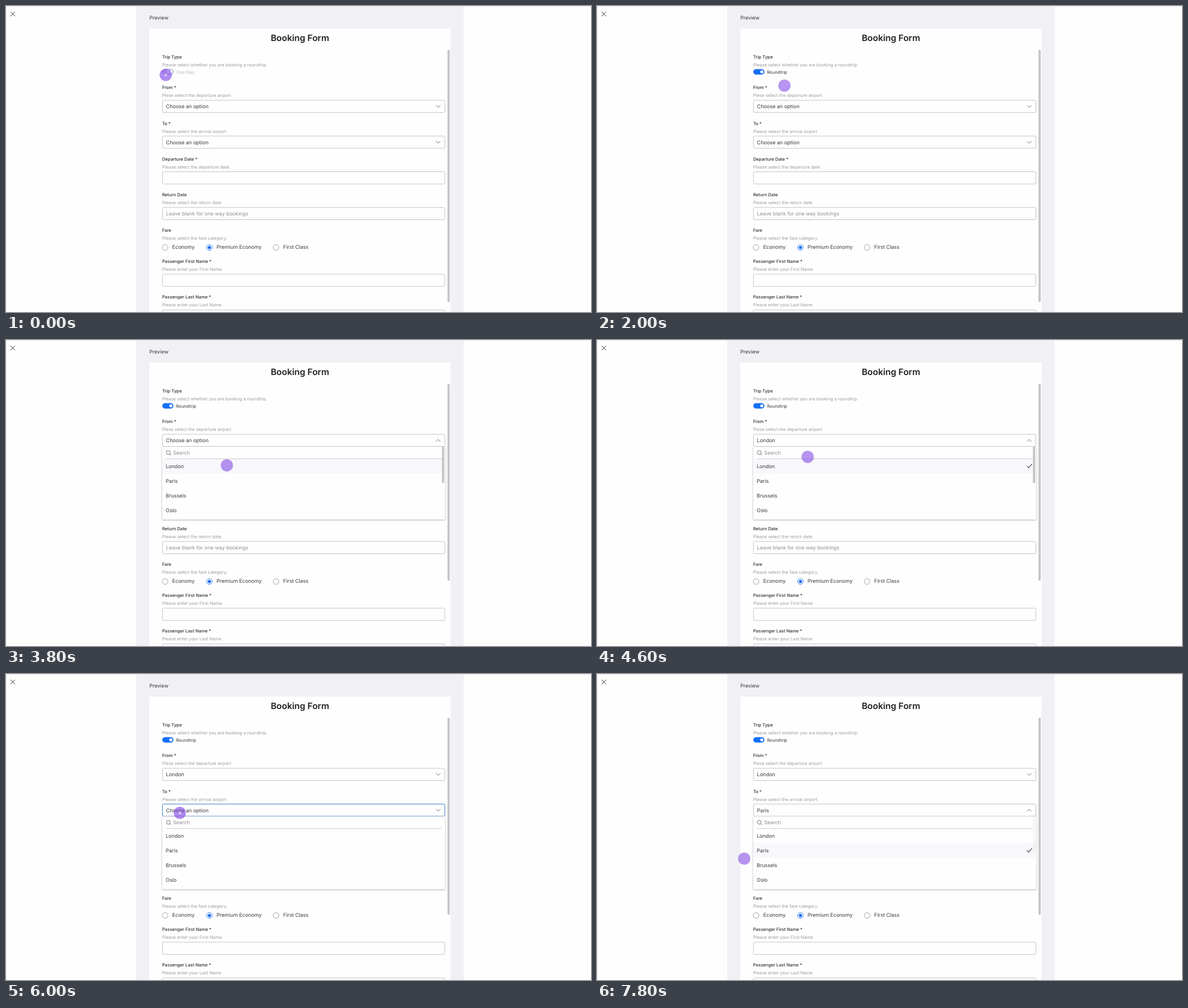
Animation of 1033x542 px, one loop 8 s. Source, as an HTML page:

```html
<!DOCTYPE html>
<html lang="en">
<head>
<meta charset="utf-8">
<title>Booking Form</title>
<style>
  html, body { margin: 0; width: 100%; height: 100%; overflow: hidden; background: #fefefe; }
  svg { display: block; }
  text { font: 400 9px Inter, sans-serif; fill: #37373d; text-rendering: geometricPrecision; }
  text.title { font-size: 15.47px; font-weight: 600; fill: #1d1d22; text-anchor: middle; }
  text.label { font-size: 7.72px; font-weight: 500; fill: #2c2c32; }
  text.hint { font-size: 7.72px; fill: #9c9ca1; }
  text.state { font-size: 7.72px; }
  text.soft { fill: #8e8e94; }
  .field { fill: #fefefe; stroke: #c3c3c8; }
  .line { fill: none; stroke: #66666c; stroke-width: .9; }
  .menu { filter: drop-shadow(0 1px 1.5px rgba(0, 0, 0, .3)); }
</style>
</head>
<body>
<svg id="stage" width="1033" height="542" viewBox="0 0 1033 542"></svg>
<script>
const stage = document.getElementById('stage');
const LOOP = 8000, STEP = 200, ROW = 63.3, ITEM = 25.8;

function add(tag, attrs, parent = stage) {
  const el = document.createElementNS('http://www.w3.org/2000/svg', tag);
  for (const k in attrs) el.setAttribute(k, attrs[k]);
  parent.appendChild(el);
  return el;
}
function text(str, x, y, cls = '', parent = stage) {
  const el = add('text', { x, y, class: cls }, parent);
  el.textContent = str;
  return el;
}
const rect = (x, y, width, height, attrs, parent) =>
  add('rect', { x, y, width, height, ...attrs }, parent);
const circle = (cx, cy, r, attrs, parent) => add('circle', { cx, cy, r, ...attrs }, parent);
const path = (d, attrs, parent) => add('path', { d, class: 'line', ...attrs }, parent);
const show = (el, on) => el.setAttribute('visibility', on ? 'visible' : 'hidden');

function heading(y, label, hint) {
  text(label, 275.7, y + 2.8, 'label');
  text(hint, 275.7, y + 16.7, 'hint');
}
const field = y => rect(276.3, y, 498.6, 21.7, { rx: 2, class: 'field' });

// Page
rect(0, 0, 1033, 542, { fill: '#fefefe' });
rect(230, 0, 578, 542, { fill: '#f1f1f5' });
rect(253, 40, 532, 502, { fill: '#fefefe' });
path('M0 .5H1033M.5 0V542', { style: 'stroke:#e9e9eb;stroke-width:1' });
path('M8 10.2l8 8m0-8l-8 8', { style: 'stroke:#333;stroke-width:1' });
text('Preview', 253, 24.2);
text('Booking Form', 519, 62.4, 'title');
const pageThumb = rect(779.6, 77.5, 4, 447, { rx: 2, fill: '#c5c5c6' });

// Toggle
heading(90, 'Trip Type', 'Please select whether you are booking a roundtrip.');
const track = rect(276.4, 112.2, 18.8, 8.8, { rx: 4.4, 'stroke-width': .9 });
const knob = circle(281, 116.6, 2.7, {});
const tripText = text('', 300.2, 120, 'state');

// Text fields
heading(271.1, 'Departure Date *', 'Please select the departure date.');
field(293.5);
heading(334.3, 'Return Date', 'Please select the return date.');
field(356.8);
text('Leave blank for one way bookings', 282.6, 371, 'soft');
heading(397.5, 'Fare', 'Please select the fare category.');
[['Economy', 281], ['Premium Economy', 359.2], ['First Class', 477]].forEach(([name, x], i) => {
  circle(x, 427.7, 5, { fill: '#fefefe', stroke: i === 1 ? '#1a6ff0' : '#98989e', 'stroke-width': .9 });
  if (i === 1) circle(x, 427.7, 2.8, { fill: '#1668f0' });
  text(name, x + 12.6, 429.9);
});
heading(452.2, 'Passenger First Name *', 'Please enter your First Name');
field(475);
heading(515.6, 'Passenger Last Name *', 'Please enter your Last Name');
field(538.3);

// Drop-downs
function dropdown(i, label, hint) {
  const dy = i * ROW;
  heading(144.6 + dy, label, hint);
  const box = field(167 + dy);
  const value = text('', 282.6, 181.2 + dy);
  const arrow = path('', {});
  return { dy, box, value, arrow };
}
function menuFor(d) {
  const g = add('g', { transform: `translate(0 ${d.dy})` });
  rect(275.8, 189, 499.8, 129, { fill: '#fefefe', class: 'menu' }, g);
  d.hover = rect(275.8, 211, 499.8, 25.5, { fill: '#f8f8fc' }, g);
  circle(286.6, 199.3, 3.5, { class: 'line' }, g);
  path('M289.2 202l2.3 2.3', {}, g);
  text('Search', 295, 203, 'soft', g);
  path('M282 210.5H769.5', { style: 'stroke:#c6c6ca' }, g);
  ['London', 'Paris', 'Brussels', 'Oslo'].forEach((c, k) => text(c, 282, 227.1 + k * ITEM, '', g));
  d.check = path('M759.3 223.3l2.8 3 6-6.6', { style: 'stroke:#333;stroke-width:1.1' }, g);
  d.thumb = rect(769.8, 188.5, 4, 65, { rx: 1.5, fill: '#c5c5c6' }, g);
  d.menu = g;
}
const from = dropdown(0, 'From *', 'Plese select the departure airport');
const to = dropdown(1, 'To *', 'Please select the arrival airport');
[from, to].forEach(menuFor);

// Times at which each drop-down opens, is hovered, is picked, loses its scrollbar and closes
Object.assign(from, { city: 'London', index: 0, open: 3000, over: 3600, pick: 4200, fade: 5000, rest: 0, close: 5400 });
Object.assign(to, { city: 'Paris', index: 1, open: 6000, over: 6600, pick: 7000, fade: 7800, rest: .15, close: LOOP });

// Pointer
const pointer = add('g', {});
const disc = circle(0, 0, 10.8, { fill: '#8246e6' }, pointer);
const spot = circle(0, 0, 2.6, { fill: '#fff', 'fill-opacity': .5 }, pointer);
const track2d = [
  [0, 282, 122], [400, 282, 122], [1000, 290, 115], [1400, 290, 115], [2000, 331, 141],
  [2400, 378, 171], [2800, 397, 183], [3200, 397, 183], [3800, 390, 222], [4200, 390, 222],
  [4600, 372, 207], [4800, 274, 240], [5000, 269, 249.5], [5400, 269, 249.5], [5800, 307, 246],
  [6200, 307, 246], [6600, 302, 312], [7000, 302, 313], [7400, 288, 322], [7600, 265, 327], [7800, 260, 327]
];
const presses = [0, 1200, 3000, 4000, 5400, 6000, 6800];

function pointAt(t) {
  const n = track2d.findIndex(p => p[0] > t);
  if (n < 0) return track2d[track2d.length - 1].slice(1);
  const [t0, x0, y0] = track2d[n - 1], [t1, x1, y1] = track2d[n];
  const k = (t - t0) / (t1 - t0);
  return [x0 + (x1 - x0) * k, y0 + (y1 - y0) * k];
}

function drawDropdown(d, t) {
  const open = t >= d.open && t < d.close;
  const picked = t >= d.pick;
  const up = open && t > d.open;
  const y = 178 + d.dy;
  show(d.menu, open);
  d.box.style.stroke = t === d.open ? '#4478c4' : '';
  d.value.textContent = picked ? d.city : 'Choose an option';
  d.arrow.setAttribute('d', up ? `M759.5 ${y + 2}l3.8-4 3.8 4` : `M759.5 ${y - 2.2}l3.8 4 3.8-4`);
  d.hover.setAttribute('transform', `translate(0 ${d.index * ITEM})`);
  d.check.setAttribute('transform', `translate(0 ${d.index * ITEM})`);
  d.hover.setAttribute('opacity', t >= d.over ? 1 : 0);
  d.check.setAttribute('opacity', picked ? 1 : 0);
  d.thumb.setAttribute('opacity', t < d.open + 2 * STEP ? 0 : t < d.fade ? 1 : d.rest);
  return open;
}

function render(t) {
  const round = t >= 1200, filled = t >= 1400;
  track.setAttribute('fill', filled ? '#146ef5' : '#fefefe');
  track.setAttribute('stroke', filled ? '#146ef5' : '#4460b4');
  knob.setAttribute('cx', round ? 291 : 281);
  knob.setAttribute('fill', filled ? '#fff' : '#c3c3d2');
  tripText.textContent = round ? 'Roundtrip' : 'One Way';
  tripText.style.fill = round ? '#37373d' : '#bbbbbf';

  const open = [from, to].map(d => drawDropdown(d, t));
  pageThumb.setAttribute('height', t >= from.open ? 349 : 447);

  const [x, y] = pointAt(t), down = presses.includes(t);
  pointer.setAttribute('transform', `translate(${x} ${y})`);
  disc.setAttribute('fill-opacity', down ? .63 : .58);
  show(spot, down);
}

const start = performance.now();
function tick() {
  const t = Math.max(0, performance.now() - start) % LOOP;
  render(Math.floor(t / STEP) * STEP);
  requestAnimationFrame(tick);
}
tick();
</script>
</body>
</html>
```
